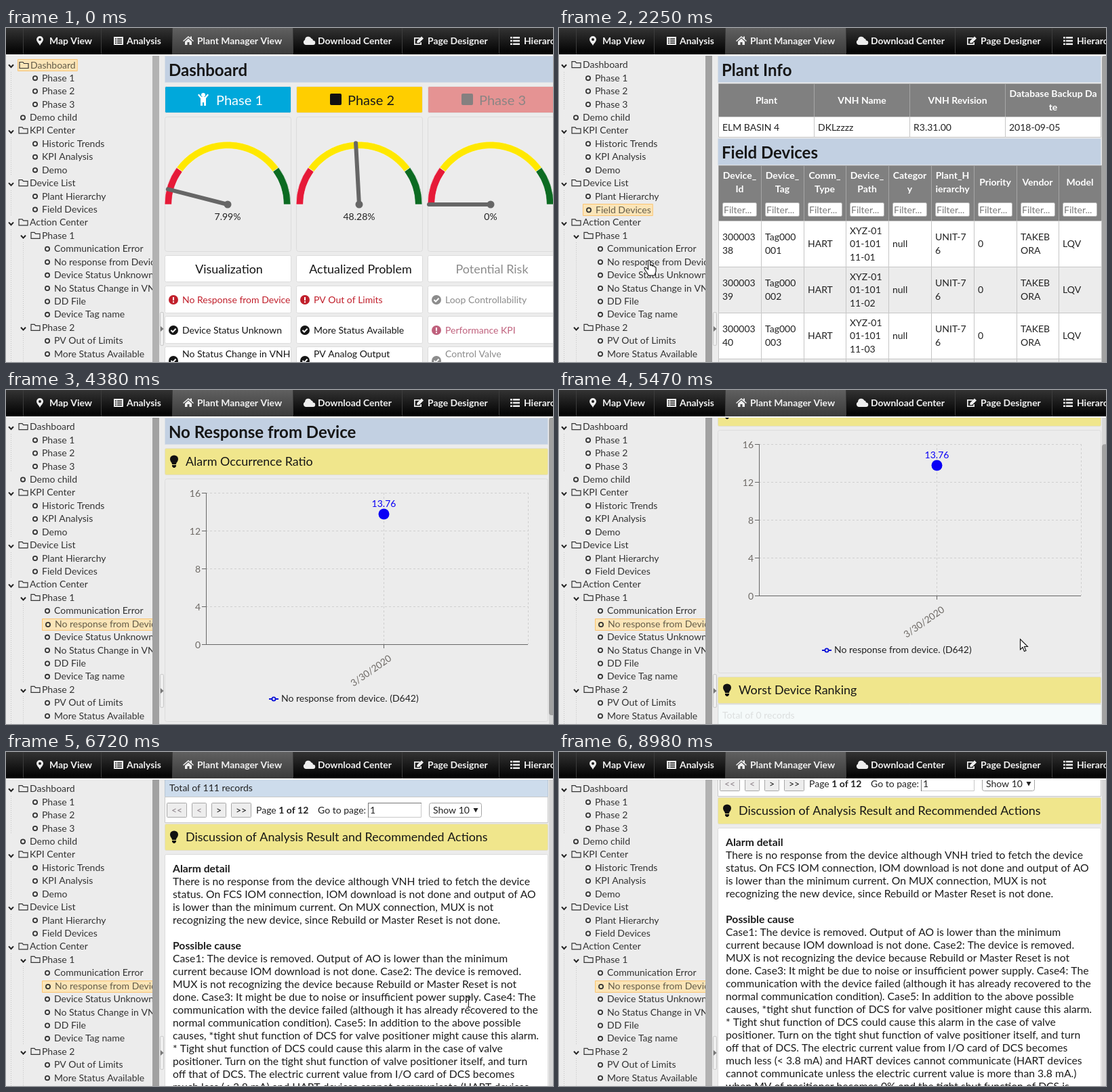
Recreate the animation shown at these times as an HTML page with a canvas. Size 807x494 px, loop 9.13 s.

```html
<!DOCTYPE html>
<html lang="en">
<head>
<meta charset="utf-8">
<title>Plant manager view</title>
<style>
html, body { margin: 0; width: 100%; height: 100%; overflow: hidden; background: #ececec; }
canvas { display: block; }
</style>
</head>
<body>
<canvas id="stage" width="807" height="494"></canvas>
<script>
const ctx = document.getElementById('stage').getContext('2d');
const LOOP = 9130, W = 807, H = 494, BG = '#ececec', LINE = '#dcdcdc';

// ---- drawing helpers ----
function box(x, y, w, h, fill, stroke, r = 0) {
  ctx.beginPath();
  if (stroke) ctx.roundRect(x + 0.5, y + 0.5, w - 1, h - 1, r);
  else ctx.roundRect(x, y, w, h, r);
  if (fill) { ctx.fillStyle = fill; ctx.fill(); }
  if (stroke) { ctx.strokeStyle = stroke; ctx.lineWidth = 1; ctx.stroke(); }
}
// y is the middle of the capitals; baselines sit on whole pixels
function text(str, x, y, color = '#222', size = 14, weight = 400, align = 'left') {
  ctx.font = `${weight} ${size}px Lato, sans-serif`;
  ctx.textAlign = align;
  ctx.fillStyle = color;
  ctx.fillText(str, x, Math.round(y + size * 0.36));
}
function lines(rows, x, y, step, ...style) {
  rows.forEach((row, i) => text(row, x, y + (i - (rows.length - 1) / 2) * step, ...style));
}
function line(x1, y1, x2, y2, color, width = 1, dash = []) {
  ctx.beginPath();
  ctx.moveTo(x1, y1);
  ctx.lineTo(x2, y2);
  ctx.setLineDash(dash);
  ctx.strokeStyle = color;
  ctx.lineWidth = width;
  ctx.stroke();
  ctx.setLineDash([]);
}
function disc(x, y, r, fill, stroke, width = 1) {
  ctx.beginPath();
  ctx.arc(x, y, r, 0, Math.PI * 2);
  if (fill) { ctx.fillStyle = fill; ctx.fill(); }
  if (stroke) { ctx.strokeStyle = stroke; ctx.lineWidth = width; ctx.stroke(); }
}
function shape(d, x, y, fill, stroke, width = 1) {
  const path = new Path2D(d);
  ctx.save();
  ctx.translate(x, y);
  if (fill) { ctx.fillStyle = fill; ctx.fill(path, 'evenodd'); }
  if (stroke) { ctx.strokeStyle = stroke; ctx.lineWidth = width; ctx.stroke(path); }
  ctx.restore();
}
function clipped(x, y, w, h, draw) {
  ctx.save();
  ctx.beginPath();
  ctx.rect(x, y, w, h);
  ctx.clip();
  draw();
  ctx.restore();
}
// eased value between [time, ...values] keys
function track(t, keys) {
  if (t <= keys[0][0]) return keys[0].slice(1);
  for (let i = 1; i < keys.length; i++) {
    const a = keys[i - 1], b = keys[i];
    if (t < b[0]) {
      const p = (t - a[0]) / (b[0] - a[0]), e = p * p * (3 - 2 * p);
      return a.slice(1).map((v, k) => v + (b[k + 1] - v) * e);
    }
  }
  return keys[keys.length - 1].slice(1);
}

// ---- icons ----
const ICON = {
  pin: 'M0 7C-2 3-5 1-5-2A5 5 0 0 1 5-2C5 1 2 3 0 7ZM2-2A2 2 0 1 0-2-2A2 2 0 1 0 2-2Z',
  list: 'M-7-6H7V6H-7ZM-5-3.5V-2H-3V-3.5ZM-5-.5V1H-3V-.5ZM-5 2.5V4H-3V2.5ZM-2-3.5V-2H5V-3.5ZM-2-.5V1H5V-.5ZM-2 2.5V4H5V2.5Z',
  home: 'M-8 0L0-7L3-4.5V-6.5H5V-2.8L8 0L7 1L0-5L-7 1ZM-5 1L0-3.5L5 1V6H1.5V2H-1.5V6H-5Z',
  cloud: 'M-5 6A4 4 0 0 1-6-1.5A5 5 0 0 1 3.5-3.5A3 3 0 0 1 6-.5A3.2 3.2 0 0 1 6 6Z',
  edit: 'M2-5H-7V6H4V2H2.3V4.3H-5.3V-3.3H.5ZM-3 3L-2.5 0L4-6.5L7-3.5L.5 3Z',
  bars: 'M-7-6H-4V-3.5H-7ZM-7-1.2H-4V1.2H-7ZM-7 3.5H-4V6H-7ZM-3-6H7V-3.5H-3ZM-3-1.2H7V1.2H-3ZM-3 3.5H7V6H-3Z',
  bulb: 'M-3 4C-3 1-6 0-6-4A6 5.5 0 0 1 6-4C6 0 3 1 3 4ZM-3 5H3V7L1 9H-1L-3 7Z',
  child: 'M3-7A3 3 0 1 0-3-7A3 3 0 1 0 3-7ZM-8-7L-6.5-8.5L-2.5-4H2.5L6.5-8.5L8-7L4-2V9H1V4H-1V9H-4V-2Z',
  folder: 'M-6.5 4.5V-4.5H-1.5L0-2.5H6.5V4.5Z',
  hand: 'M-1.5 1.5Q0-1 1.5 1.5V8Q4 7 4.5 9Q7 8 7.5 10Q10 10 10 12V17Q9 20 8 23H-1Q-3 19-6 15Q-8 12-6 11Q-4 11-1.5 14Z',
  arrow: 'M.5.5V16L4 12.5L6.5 18.5L9 17.5L6.5 11.5H11.5Z',
  beam: 'M-3-7.5H3M0-7.5V7.5M-3 7.5H3'
};

// ---- top navigation ----
const NAV = [
  ['pin', 50, 64, 'Map View'], ['list', 166, 178, 'Analysis'],
  ['home', 269, 282, 'Plant Manager View'], ['cloud', 447, 460, 'Download Center'],
  ['edit', 609, 622, 'Page Designer'], ['bars', 751, 764, 'Hierarchy']
];
function nav() {
  const shade = (top, bottom) => {
    const g = ctx.createLinearGradient(0, 0, 0, 39);
    g.addColorStop(0, top);
    g.addColorStop(1, bottom);
    return g;
  };
  box(0, 0, W, 39, shade('#333', '#000'));
  box(246, 0, 177, 39, shade('#606060', '#3a3a3a'));
  box(0, 39, W, 2, '#f6f6f6');
  for (const x of [25, 140, 245, 423, 584, 727]) line(x + 0.5, 0, x + 0.5, 39, '#3c3c3c');
  for (const [icon, x, tx, label] of NAV) {
    shape(ICON[icon], x, 19, '#eee');
    text(label, tx, 19, '#f2f2f2', 13.9, 700);
  }
}

// ---- tree: level, label, folder flag ----
const TREE = [
  [0, 'Dashboard', 1], [1, 'Phase 1'], [1, 'Phase 2'], [1, 'Phase 3'], [0, 'Demo child'],
  [0, 'KPI Center', 1], [1, 'Historic Trends'], [1, 'KPI Analysis'], [1, 'Demo'],
  [0, 'Device List', 1], [1, 'Plant Hierarchy'], [1, 'Field Devices'],
  [0, 'Action Center', 1], [1, 'Phase 1', 1], [2, 'Communication Error'],
  [2, 'No response from Device'], [2, 'Device Status Unknown'], [2, 'No Status Change in VNH'],
  [2, 'DD File'], [2, 'Device Tag name'], [1, 'Phase 2', 1], [2, 'PV Out of Limits'],
  [2, 'More Status Available']
];
const GUIDES = [[7, 65, 122], [7, 162, 218], [7, 240, 277], [7, 298, 494], [25, 317, 433], [25, 453, 494]];

function sidebar(t, selected) {
  box(0, 41, 234, 453, BG);
  clipped(0, 41, 216, 453, () => {
    for (const [x, y1, y2] of GUIDES) line(x + 0.5, y1, x + 0.5, y2, '#c4c4c4', 1, [1, 2]);
    TREE.forEach(([level, label, folder], i) => {
      let x = 35 + 18 * level, y = 54.2 + 19.43 * i;
      const active = i === selected, color = active ? '#635c49' : '#333';
      if (folder) shape('M-3.5-2L0 1.8L3.5-2', x - 27.5, y + 2, null, '#222', 2);
      if (active) {
        ctx.font = '400 14px Lato, sans-serif';
        box(x - 18, Math.round(y - 8), ctx.measureText(label).width + 22, 18, '#fbe5b8', '#fbc471');
        x += 1;
        y += 0.8;
      }
      if (folder) shape(ICON.folder, x - 9.5, y, null, '#333', 1.2);
      else disc(x - 10, y + 0.5, 3.1, null, '#333', 1.8);
      text(label, x, y, color);
    });
  });
  // the thumb is paler while the window has no focus
  box(216, 41, 10, 453, t < 1080 || t >= 8980 ? '#b2b2b2' : '#a1a1a1');
  box(227, 420, 6, 50, '#f0f0f0', '#c4c4c4', 2);
  shape('M-2-4L2.5 0L-2 4Z', 230, 445, '#777');
}

// ---- shared page parts ----
function title(label, y, right = 800) {
  box(234, y, right - 234, 40, '#c2d0e2', '#d8dee6');
  text(label, 240, y + 21, '#161616', 24, 700);
}
function section(label, y) {
  box(234, y - 20, 566, 40, '#f0e68c', '#e2dfc8', 2);
  shape(ICON.bulb, 248, y, '#111');
  text(label, 265, y, '#161616', 17.92);
}
function spinner(x, y, turn, label) {
  disc(x, y, 14.7, null, '#e4e4e4', 3);
  const a = (turn - 0.375) * Math.PI * 2;
  ctx.beginPath();
  ctx.arc(x, y, 14.7, a, a + Math.PI / 2);
  ctx.strokeStyle = '#767676';
  ctx.stroke();
  if (label) text(label, x, y + 35, '#222', 14, 400, 'center');
}
function emptyTotal(y, right) {
  box(235, y, right - 235, 31, '#f5fafa', '#eaf0f0');
  text('Total of 0 records', 241, y + 16, '#dcdfdf');
}
function scrollbar(top, length) {
  box(801, 41, 10, 453, '#d6d6d6');
  box(801, top, 10, length, '#a1a1a1', null, 4);
}

// ---- dashboard ----
const RED = '#c1202c', INK = '#151515', FADED = '#8c8c8c', ROSE = '#bf607c';
const CARDS = [
  { x: 235, name: 'Phase 1', fill: '#00a8db', ink: '#fff', value: 7.99, head: 'Visualization', headInk: INK,
    items: [['No Response from Device', RED], ['Device Status Unknown', INK], ['No Status Change in VNH', INK]] },
  { x: 429, name: 'Phase 2', fill: '#ffce00', ink: '#1a1a1a', value: 48.28, head: 'Actualized Problem', headInk: INK,
    items: [['PV Out of Limits', RED], ['More Status Available', INK], ['PV Analog Output', INK]] },
  { x: 623, name: 'Phase 3', fill: '#e59393', ink: '#8b8584', value: 0, head: 'Potential Risk', headInk: FADED,
    items: [['Loop Controllability', FADED], ['Performance KPI', ROSE], ['Control Valve', FADED]] }
];
function gauge(x, y, value) {
  const at = p => Math.PI * (1 + p / 100);
  for (const [from, to, color] of [[0, 20, '#e61a38'], [20, 80, '#ffe800'], [80, 100, '#0c6b22']]) {
    ctx.beginPath();
    ctx.arc(x, y, 93, at(from), at(to));
    ctx.arc(x, y, 82.5, at(to), at(from), true);
    ctx.closePath();
    ctx.fillStyle = color;
    ctx.fill();
    ctx.strokeStyle = '#f4f4f4';
    ctx.lineWidth = 0.7;
    ctx.stroke();
  }
  ctx.lineCap = 'round';
  line(x, y, x + 91 * Math.cos(at(value)), y + 91 * Math.sin(at(value)), '#666', 6);
  ctx.lineCap = 'butt';
  disc(x, y, 5.5, '#666');
  text(value + '%', x, y + 18, '#222', 14, 400, 'center');
}
function badge(x, y, color) {
  disc(x, y, 7, color);
  if (color === RED || color === ROSE) {
    line(x, y - 4, x, y + 1, '#fff', 2);
    line(x, y + 2.3, x, y + 4.3, '#fff', 2);
  } else shape('M-3.5 0L-1 2.6L3.6-2.2', x, y, null, '#fff', 2);
}
function dashboard() {
  title('Dashboard', 41, 809);
  CARDS.forEach((c, i) => {
    box(c.x - 1, 86, 187, 40, c.fill, '#e0e0e0', 2);
    if (i) box(c.x + 49, 97, 17, 17, i === 1 ? '#111' : '#858080', null, 2);
    else shape(ICON.child, 291, 106, '#fff');
    text(c.name, c.x + 75, 107, c.ink, 20);
    box(c.x - 1, 131, 187, 200, BG, LINE, 3);
    gauge(c.x + 92, 261, c.value);
    box(c.x - 1, 336, 187, 40, '#fff', LINE, 2);
    text(c.head, c.x + 94, 357, c.headInk, 17.92, 400, 'center');
    c.items.forEach(([label, color], k) => {
      const y = 402 + 45 * k;
      box(c.x - 1, y - 21, 187, 41, '#fff', LINE, 2);
      badge(c.x + 12, k === 2 ? 492 : y, color);
      text(label, c.x + 25, k === 2 ? 482 : y, color);
    });
  });
}

// ---- plant info and device table ----
const COLS = [['Device_', 'Id'], ['Device_', 'Tag'], ['Comm_', 'Type'], ['Device_', 'Path'], ['Categor', 'y'],
  ['Plant_H', 'ierarchy'], ['Priority'], ['Vendor'], ['Model']];
const cell = (x, y, w, h, fill, stroke) => box(x, y, w + 1, h + 1, fill, stroke);

function deviceTable(y, count) {
  const colX = i => Math.round(235 + i * 62.8);
  COLS.forEach((label, i) => {
    const x = colX(i), w = colX(i + 1) - x;
    cell(x, y, w, 82, '#808080', '#a6a6a6');
    lines(label, x + w / 2, y + 25, 19.5, '#fff', 14, 700, 'center');
    box(x + 6, y + 55, 51, 21, '#fff', '#b8b8b8', 2);
    text('Filter...', x + 8, y + 65.5, '#7a7a7a');
  });
  for (let r = 0; r < count; r++) {
    const n = String(r + 1).padStart(2, '0');
    const row = [['300003', 38 + r], ['Tag000', '0' + n], ['HART'], ['XYZ-01', '01-101', '11-' + n], ['null'],
      ['UNIT-7', '6'], ['0'], ['TAKEB', 'ORA'], ['LQV']];
    row.forEach((label, i) => {
      const x = colX(i), top = y + 82 + r * 68;
      cell(x, top, colX(i + 1) - x, 68, r % 2 ? '#ececec' : '#fff', '#c6c6c6');
      lines(label, x + 6, top + 34, 19.5, '#222');
    });
  }
}
function plantLoading(t) {
  const turn = (t - 1470) / 600;
  box(234, 81, 580, 80, '#fcfcfc', LINE);
  title('Plant Info', 41, 809);
  spinner(522, 109, turn, 'Fetching table data');
  box(234, 201, 580, 240, '#fcfcfc', LINE);
  title('Field Devices', 161, 809);
  emptyTotal(202, 809);
  spinner(522, 308, turn, 'Fetching table data');
}
function plantInfo() {
  title('Plant Info', 41);
  const head = [['Plant'], ['VNH Name'], ['VNH Revision'], ['Database Backup Da', 'te']];
  const row = ['ELM BASIN 4', 'DKLzzzz', 'R3.31.00', '2018-09-05'];
  head.forEach((label, i) => {
    const x = 235 + i * 141;
    cell(x, 82, 141, 49, '#808080', '#a6a6a6');
    lines(label, x + 71, 107, 19.5, '#fff', 14, 700, 'center');
    cell(x, 131, 141, 30, '#fff', '#c6c6c6');
    text(row[i], x + 6, 147);
  });
  title('Field Devices', 163);
  deviceTable(203, 4);
  scrollbar(41, 470);
}

// ---- alarm page ----
const REPORT = [
  '#Alarm detail',
  'There is no response from the device although VNH tried to fetch the device',
  'status. On FCS IOM connection, IOM download is not done and output of AO',
  'is lower than the minimum current. On MUX connection, MUX is not',
  'recognizing the new device, since Rebuild or Master Reset is not done.',
  '',
  '#Possible cause',
  'Case1: The device is removed. Output of AO is lower than the minimum',
  'current because IOM download is not done. Case2: The device is removed.',
  'MUX is not recognizing the device because Rebuild or Master Reset is not',
  'done. Case3: It might be due to noise or insufficient power supply. Case4: The',
  'communication with the device failed (although it has already recovered to the',
  'normal communication condition). Case5: In addition to the above possible',
  'causes, *tight shut function of DCS for valve positioner might cause this alarm.',
  '* Tight shut function of DCS could cause this alarm in the case of valve',
  'positioner. Turn on the tight shut function of valve positioner itself, and turn',
  'off that of DCS. The electric current value from I/O card of DCS becomes',
  'much less (< 3.8 mA) and HART devices cannot communicate (HART devices',
  'cannot communicate unless the electric current value is more than 3.8 mA.)',
  'when MV of positioner becomes 0% and the tight shut function of DCS is'
];
const LOADED = 6310, GROWTH = 631;

function chart() {
  box(234, 131, 566, 360, BG, LINE, 3);
  for (let i = 0; i < 5; i++) {
    const y = 376.5 - i * 56;
    if (i) line(295, y, 770, y, '#cfcfcf', 1, [3, 3]);
    line(289, y, 295, y, '#666');
    text(String(i * 4), 287, y, '#6e6a66', 14, 400, 'right');
  }
  for (const x of [557.5, 770.5]) line(x, 152, x, 376, '#cfcfcf', 1, [3, 3]);
  line(295.5, 152, 295.5, 377, '#666');
  line(295, 376.5, 770, 376.5, '#666');
  line(557.5, 376, 557.5, 382, '#666');
  disc(557.5, 183.5, 8, '#0a00f5');
  text('13.76', 557.5, 168, '#0a00f5', 14, 400, 'center');
  ctx.save();
  ctx.translate(564, 391);
  ctx.rotate(-35 * Math.PI / 180);
  text('3/30/2020', 0, 5, '#6e6a66', 14, 400, 'right');
  ctx.restore();
  line(388, 457, 402, 457, '#0a10d8', 2);
  disc(395, 457, 2.6, BG, '#0a10d8', 1.8);
  text('No response from device. (D642)', 406, 456);
}
// c is the middle of the section header below the pager
function pager(c) {
  box(234, c - 88, 566, 29, '#cddcec', '#b9c6d4');
  text('Total of 111 records', 241, c - 73);
  box(234, c - 60, 566, 39, '#fff', '#c9c9c9');
  const y = c - 40;
  [['<<', 237, 30], ['<', 274, 22], ['>', 303, 22], ['>>', 332, 30]].forEach(([label, x, w], i) => {
    box(x, y - 11, w, 22, '#ededed', '#a8a8a8', 1);
    text(label, x + w / 2, y, i < 2 ? '#8a7f86' : '#111', 14, 400, 'center');
  });
  text('Page ', 369, y - 0.5);
  const w = ctx.measureText('Page ').width;
  text('1 of 12', 369 + w, y - 0.5, '#222', 14, 700);
  text('Go to page:', 460, y);
  box(534, y - 11, 79, 22, '#fff', '#c8c8c8');
  line(534, y - 10.5, 613, y - 10.5, '#777');
  line(534.5, y - 11, 534.5, y + 11, '#777');
  text('1', 537, y);
  box(624, y - 11, 78, 22, '#fff', '#a5a5a5', 3);
  text('Show 10', 630, y);
  shape('M-3.5-3H3.5L0 3.5Z', 693, y, '#222');
}
function report(c) {
  box(234, c + 25, 566, 900, '#fff', LINE, 2);
  REPORT.forEach((row, i) => {
    const bold = row[0] === '#';
    text(bold ? row.slice(1) : row, 246, c + 46.5 + i * 19, '#1c1c1c', 15.73, bold ? 700 : 400);
  });
}
function alarmPage(t) {
  if (t < 4380) {
    title('No Response from Device', 41);
    section('Alarm Occurrence Ratio', 106);
    box(234, 131, 566, 200, '#fcfcfc', LINE);
    spinner(517, 223, t / 600);
    scrollbar(41, 470);
    return;
  }
  const loaded = t >= LOADED;
  const scroll = t >= 6820 ? 1300
    : Math.round(track(t, [[5250, 0], [6060, 400], [LOADED, 400], [6700, 1261]])[0]);
  const mid = 756 + (loaded ? GROWTH : 0);
  ctx.save();
  ctx.translate(0, -scroll);
  title('No Response from Device', 41);
  section('Alarm Occurrence Ratio', 106);
  chart();
  section('Worst Device Ranking', 516);
  if (loaded) {
    deviceTable(537, 10);
    pager(mid);
  } else {
    box(234, 536, 566, 200, '#fcfcfc', LINE);
    emptyTotal(537, 800);
    spinner(517, 623, (t - 6100) / 600 - 0.125, 'Fetching table data');
  }
  section('Discussion of Analysis Result and Recommended Actions', mid);
  report(mid);
  ctx.restore();
  scrollbar(41 + scroll * (loaded ? 0.37 : 0.545), loaded ? 260 : 440);
}

// ---- pointer ----
const POINTER = [
  [130, 444, 454], [620, 80, 260], [770, 80, 260], [840, 82, 262], [1080, 82, 262], [1170, 78, 251],
  [1400, 78, 251], [1470, 83, 262], [1620, 83, 262], [2250, 133, 343], [2740, 133, 343], [2960, 131, 347]
];
function pointer(t) {
  const draw = (icon, x, y) => shape(ICON[icon], x, y, '#fff', '#111', 1.1);
  if (t >= 130 && t < 4380) {
    const [x, y] = track(t, POINTER);
    draw(x > 216 ? 'arrow' : 'hand', x, y);
  } else if (t >= 5250 && t < 6700) {
    draw('arrow', 680, 368);
  } else if (t >= 6700 && t < 8290) {
    const moved = t >= 8200;
    shape(ICON.beam, moved ? 738.5 : 682.5, moved ? 388 : 370, null, '#222', 1);
  }
}

// ---- playback ----
function paint(t) {
  box(0, 0, W, H, BG);
  clipped(234, 41, W - 234, H - 41, () => {
    if (t < 1470) dashboard();
    else if (t < 2250) plantLoading(t);
    else if (t < 3500) plantInfo();
    else alarmPage(t);
  });
  sidebar(t, t < 1470 ? 0 : t < 3500 ? 11 : 15);
  nav();
  pointer(t);
}
let start;
function tick(now) {
  start ??= now;
  paint((now - start) % LOOP);
  requestAnimationFrame(tick);
}
requestAnimationFrame(tick);
</script>
</body>
</html>
```
